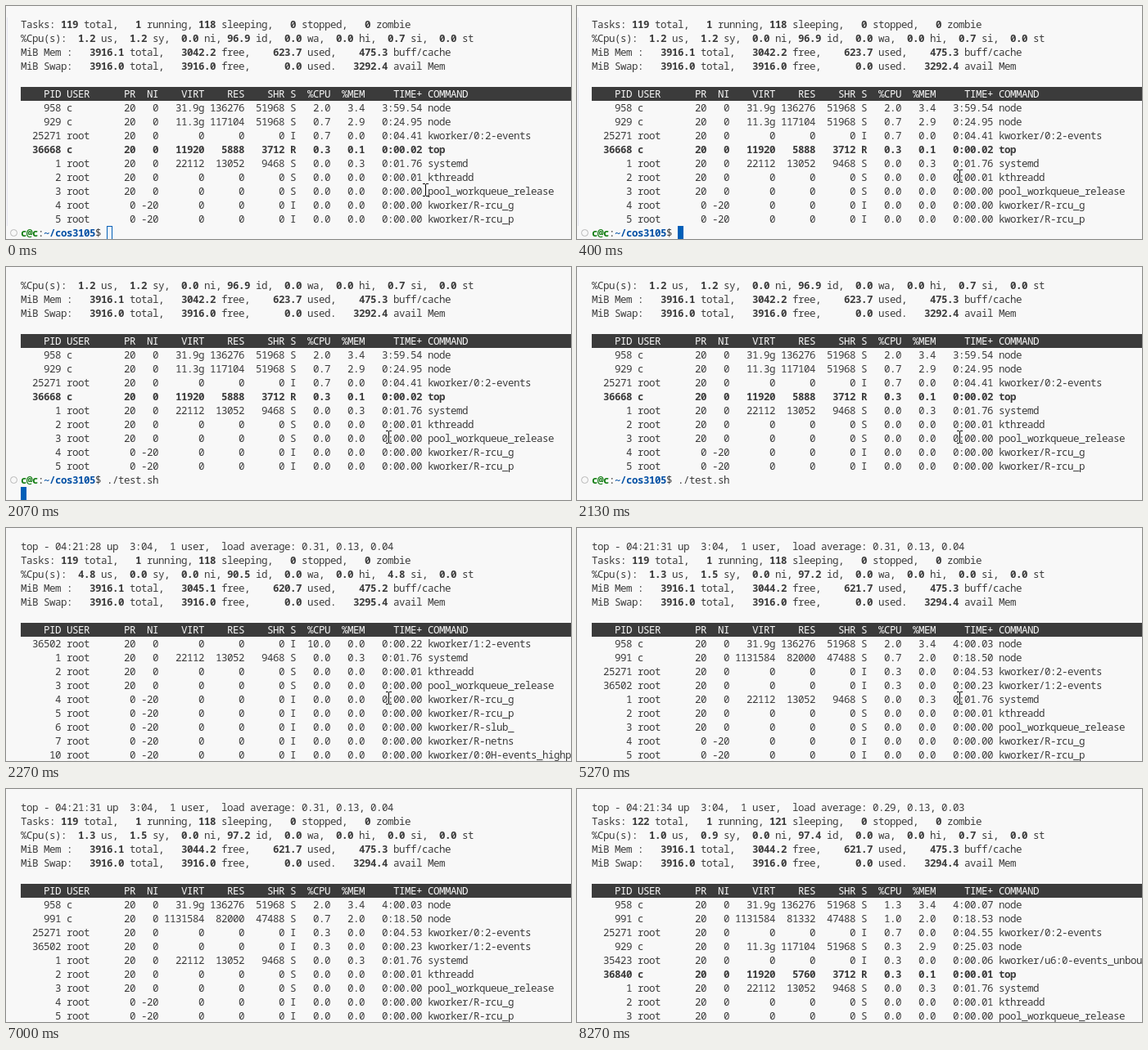
Animation of 690x285 px, one loop 9200 ms. Source, as an HTML page:

```html
<!DOCTYPE html>
<html lang="en">
<head>
<meta charset="utf-8">
<title>Terminal running top</title>
<style>
html, body { margin: 0; width: 100%; height: 100%; overflow: hidden; background: #f8f8f8; }
#stage { position: relative; width: 690px; height: 285px; overflow: hidden; background: #f8f8f8; }
#terminal { position: absolute; top: 14px; left: 0; width: 690px; height: 271px; overflow: hidden; }
/* The tracking keeps every glyph on the terminal's 7px cell grid. */
.screen {
  position: absolute; top: 0; left: 18px; width: 672px;
  font: 12.5px/17px "Noto Sans Mono", "DejaVu Sans Mono", monospace;
  letter-spacing: calc(7px - 1ch);
  color: #3b3b3b; white-space: pre; font-variant-ligatures: none;
}
.screen div { height: 17px; }
.screen .head { background: #3b3b3b; color: #f8f8f8; font-weight: 500; }
.user { color: #107c10; }
.path { color: #0451a5; }
[hidden] { display: none; }
#dot {
  position: absolute; left: -13px; top: 259px; width: 9px; height: 9px;
  box-sizing: border-box; border: 1px solid #b8b8b8; border-radius: 50%;
}
#cursor {
  position: absolute; left: 0; top: 0; width: 7px; height: 17px;
  box-sizing: border-box; border: 1px solid #005fb8;
}
#guide { position: absolute; left: 1px; top: 0; width: 1px; height: 255px; background: #e4e6f1; }
#pointer { position: absolute; left: 0; top: 0; }
</style>
</head>
<body>
<div id="stage">
  <div id="terminal">
    <i id="guide"></i>
    <i id="cursor"></i>
  </div>
  <svg id="pointer" width="7" height="16" fill="none" stroke="#000">
    <path d="M0 .5h3m1 0h3M3.5 1v14M0 15.5h3m1 0h3"/>
  </svg>
</div>
<script>
const LOOP = 9200, ROW = 17, CELL = 7, LEFT = 18;
const $ = id => document.getElementById(id);
const terminal = $('terminal');

const HEAD = '    PID USER      PR  NI    VIRT    RES    SHR S  %CPU  %MEM     TIME+ COMMAND';
const WIDTHS = [7, -8, 3, 3, 7, 6, 6, 1, 5, 5, 9, -1];

const kernel = (pid, time, command, state = 'I', cpu = '0.0', nice = '20 0') =>
  `${pid} root ${nice} 0 0 0 ${state} ${cpu} 0.0 ${time} ${command}`;
const worker = (pid, name) => kernel(pid, '0:00.00', 'kworker/' + name, 'I', '0.0', '0 -20');

const system = [
  '1 root 20 0 22112 13052 9468 S 0.0 0.3 0:01.76 systemd',
  kernel(2, '0:00.01', 'kthreadd', 'S'),
  kernel(3, '0:00.00', 'pool_workqueue_release', 'S'),
  worker(4, 'R-rcu_g'), worker(5, 'R-rcu_p'), worker(6, 'R-slub_'),
  worker(7, 'R-netns'), worker(10, '0:0H-events_highp')
];

const line = (html, cls = '') => `<div class="${cls}">${html}</div>`;
const boldNumbers = text => text.replace(/\d+(\.\d+)?/g, '<b>$&</b>');

function processLine(row) {
  const fields = row.split(' ');
  const text = fields.map((f, i) => WIDTHS[i] < 0 ? f.padEnd(-WIDTHS[i]) : f.padStart(WIDTHS[i])).join(' ');
  return line(fields[7] === 'R' ? `<b>${text}</b>` : text);
}

function report({ clock, load, tasks = [119, 118], cpu, free, used, cache, avail, rows }) {
  const units = ['us', 'sy', 'ni', 'id', 'wa', 'hi', 'si', 'st'];
  const num = v => v.padStart(9);
  const usage = cpu.split(' ').map((v, i) => `${v.padStart(5)} ${units[i]}`).join(',');
  const summary = [
    `Tasks: ${tasks[0]} total,   1 running, ${tasks[1]} sleeping,   0 stopped,   0 zombie`,
    `%Cpu(s):${usage}`,
    `MiB Mem :   3916.1 total,${num(free)} free,${num(used)} used,${num(cache)} buff/cache`,
    `MiB Swap:   3916.0 total,   3916.0 free,      0.0 used.${num(avail)} avail Mem`
  ];
  return (clock ? line(`top - ${clock} up  3:04,  1 user,  load average: ${load}`) : '') +
    summary.map(s => line(boldNumbers(s))).join('') +
    line('') + line(HEAD, 'head') + rows.map(processLine).join('');
}

function addScreen(start, html) {
  const el = document.createElement('div');
  el.className = 'screen';
  el.innerHTML = html;
  terminal.prepend(el);
  return { start, el };
}

const prompt = line('<b class="user">c@c</b>:<b class="path">~/cos3105</b>$ <span id="typed">./test.sh</span>') +
  '<i id="dot"></i>';

const screens = [
  addScreen(0, report({
    cpu: '1.2 1.2 0.0 96.9 0.0 0.0 0.7 0.0',
    free: '3042.2', used: '623.7', cache: '475.3', avail: '3292.4',
    rows: [
      '958 c 20 0 31.9g 136276 51968 S 2.0 3.4 3:59.54 node',
      '929 c 20 0 11.3g 117104 51968 S 0.7 2.9 0:24.95 node',
      kernel(25271, '0:04.41', 'kworker/0:2-events', 'I', '0.7'),
      '36668 c 20 0 11920 5888 3712 R 0.3 0.1 0:00.02 top',
      ...system.slice(0, 5)
    ]
  }) + prompt),
  addScreen(2270, report({
    clock: '04:21:28', load: '0.31, 0.13, 0.04',
    cpu: '4.8 0.0 0.0 90.5 0.0 0.0 4.8 0.0',
    free: '3045.1', used: '620.7', cache: '475.2', avail: '3295.4',
    rows: [kernel(36502, '0:00.22', 'kworker/1:2-events', 'I', '10.0'), ...system]
  })),
  addScreen(5270, report({
    clock: '04:21:31', load: '0.31, 0.13, 0.04',
    cpu: '1.3 1.5 0.0 97.2 0.0 0.0 0.0 0.0',
    free: '3044.2', used: '621.7', cache: '475.3', avail: '3294.4',
    rows: [
      '958 c 20 0 31.9g 136276 51968 S 2.0 3.4 4:00.03 node',
      '991 c 20 0 1131584 82000 47488 S 0.7 2.0 0:18.50 node',
      kernel(25271, '0:04.53', 'kworker/0:2-events', 'I', '0.3'),
      kernel(36502, '0:00.23', 'kworker/1:2-events', 'I', '0.3'),
      ...system.slice(0, 5)
    ]
  })),
  addScreen(8270, report({
    clock: '04:21:34', load: '0.29, 0.13, 0.03', tasks: [122, 121],
    cpu: '1.0 0.9 0.0 97.4 0.0 0.0 0.7 0.0',
    free: '3044.2', used: '621.7', cache: '475.3', avail: '3294.4',
    rows: [
      '958 c 20 0 31.9g 136276 51968 S 1.3 3.4 4:00.07 node',
      '991 c 20 0 1131584 81332 47488 S 1.0 2.0 0:18.53 node',
      kernel(25271, '0:04.55', 'kworker/0:2-events', 'I', '0.7'),
      '929 c 20 0 11.3g 117104 51968 S 0.3 2.9 0:25.03 node',
      kernel(35423, '0:00.06', 'kworker/u6:0-events_unbou', 'I', '0.3'),
      '36840 c 20 0 11920 5760 3712 R 0.3 0.1 0:00.01 top',
      ...system.slice(0, 3)
    ]
  }))
];

const moveTo = (el, x, y) => { el.style.transform = `translate(${x}px, ${y}px)`; };

function drawShell(t) {
  const typed = t >= 1470, entered = t >= 2070;
  const column = entered ? 0 : typed ? 24 : 15;
  screens[0].el.style.top = entered ? -ROW + 'px' : 0;
  $('typed').hidden = !typed;
  $('guide').hidden = typed;
  $('cursor').hidden = t >= 2130;
  $('cursor').style.background = t >= 400 ? '#005fb8' : 'none';
  moveTo($('cursor'), LEFT + column * CELL, 15 * ROW);
}

function drawPointer(t) {
  const pointer = $('pointer');
  pointer.style.display = t < 7000 ? '' : 'none';
  if (t < 70) return moveTo(pointer, 509, 217);
  // The pointer leaves in discrete steps through the bottom edge.
  const step = t < 6130 ? 0 : Math.min(13, 1 + Math.floor((t - 6130) / 67));
  const p = step / 13, eased = p * p * (3 - 2 * p);
  moveTo(pointer, Math.round(464 - 406 * eased), Math.round(200 + 77 * eased));
}

const start = performance.now();
function draw() {
  const t = (performance.now() - start) % LOOP;
  const current = screens.filter(s => s.start <= t).pop();
  for (const s of screens) s.el.hidden = s !== current;
  drawShell(t);
  drawPointer(t);
  requestAnimationFrame(draw);
}
draw();
</script>
</body>
</html>
```
